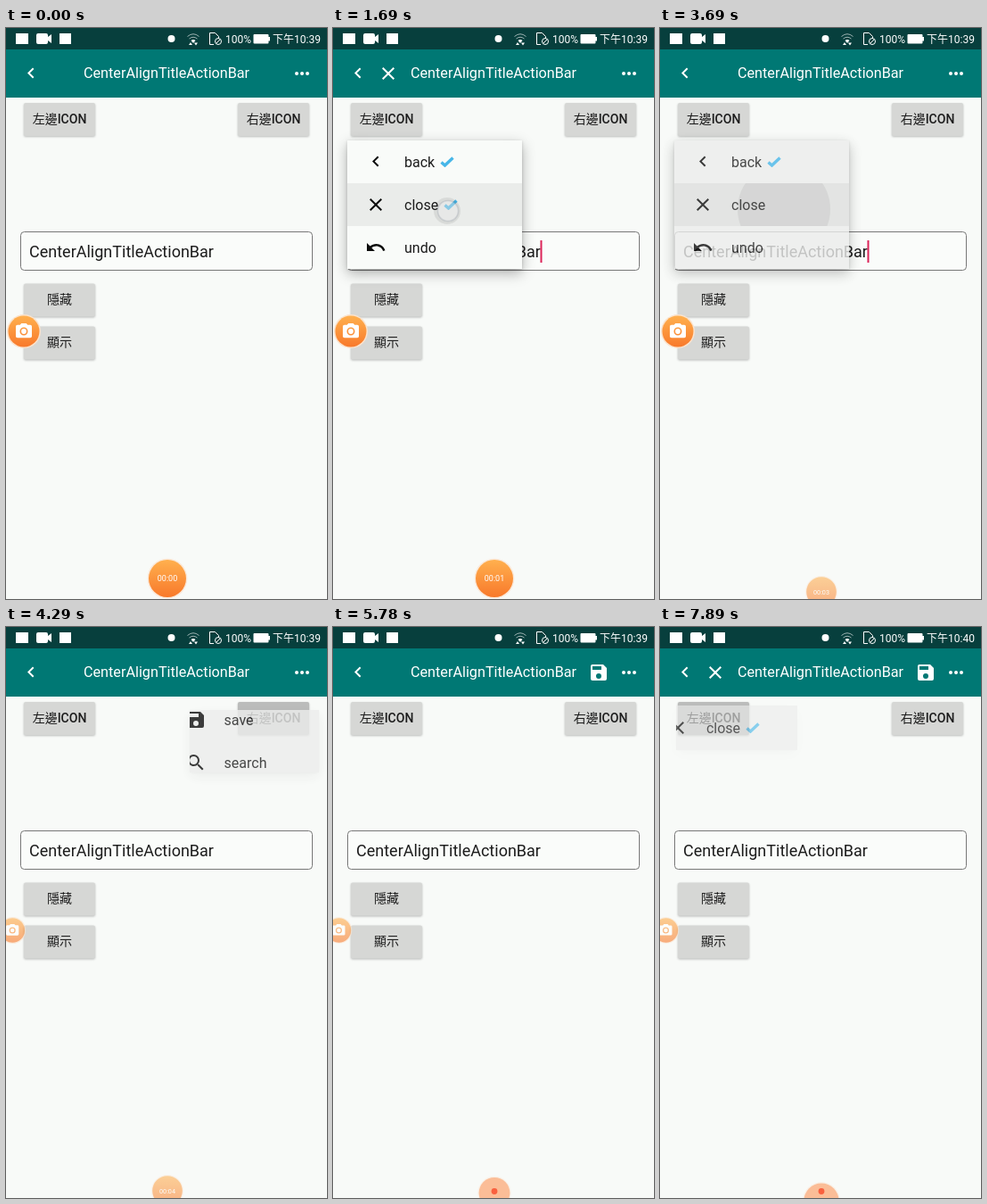
Animation, 360 px wide and 640 px high, one loop 7.99 s. Source, as an HTML page:

```html
<!DOCTYPE html>
<html lang="zh-Hant">
<head>
<meta charset="utf-8">
<title>CenterAlignTitleActionBar</title>
<style>
  html, body { margin: 0; width: 100%; height: 100%; overflow: hidden; background: #f8faf8; }
  body { position: relative; font-family: Roboto, "Noto Sans CJK TC", "Noto Sans CJK JP", "Noto Sans CJK", sans-serif; }
  svg text { font-family: inherit; }
  .layer { position: absolute; left: 0; top: 0; width: 360px; height: 640px; }
  .btn rect { fill: #d6d7d5; filter: drop-shadow(0 1px 1px rgba(0,0,0,.25)); }
  .btn.pressed rect { fill: #bbbcbb; }
  .btn text { font-size: 14px; font-weight: 500; fill: #1c1c1c; text-anchor: middle; }
  .menu { position: absolute; overflow: hidden; box-shadow: 0 5px 14px rgba(0,0,0,calc(.3 * var(--lift))), 0 1px 3px rgba(0,0,0,calc(.16 * var(--lift))); }
  .list { position: absolute; left: 50%; top: 50%; width: 196px; transform: translate(-50%, -50%); }
  .row { position: relative; height: 48px; overflow: hidden; font-size: 16px; line-height: 48px; color: #1c1c1c; }
  .row.held { background: rgba(0,0,0,.06); }
  .row > svg { position: absolute; left: 20px; top: 12px; fill: #0c0c0c; }
  .row span { position: absolute; left: 64px; top: 1px; white-space: nowrap; }
  .row .tick { margin-left: 6px; fill: none; stroke: #47b6e8; stroke-width: 3.4; }
  .ripple { position: absolute; border-radius: 50%; background: rgba(0,0,0,.075); transform: translate(-50%, -50%); }
</style>
</head>
<body>
<svg class="layer" viewBox="0 0 360 640">
  <defs>
    <path id="back" d="M15.400 16.100 10.800 11.500l4.600-4.600L14 5.500l-6 6 6 6z"/>
    <path id="close" d="M19 6.4 17.6 5 12 10.6 6.4 5 5 6.4l5.6 5.6L5 17.6 6.4 19l5.6-5.6 5.6 5.6 1.4-1.4-5.6-5.6z"/>
    <path id="undo" d="M12.5 8c-2.65 0-5.05.99-6.9 2.6L2 7v9h9l-3.62-3.62c1.39-1.16 3.16-1.88 5.12-1.88 3.54 0 6.55 2.31 7.6 5.5l2.37-.78C21.08 11.03 17.15 8 12.5 8z"/>
    <path id="horiz" d="M6 10a2 2 0 1 0 0 4 2 2 0 0 0 0-4zm6 0a2 2 0 1 0 0 4 2 2 0 0 0 0-4zm6 0a2 2 0 1 0 0 4 2 2 0 0 0 0-4z"/>
    <path id="save" d="M17 3H5a2 2 0 0 0-2 2v14a2 2 0 0 0 2 2h14a2 2 0 0 0 2-2V7zm-5 16a3 3 0 1 1 0-6 3 3 0 0 1 0 6zm3-10H5V5h10z"/>
    <path id="search" d="M15.5 14h-.8l-.3-.3a6.5 6.5 0 1 0-.7.7l.3.3v.8l5 5 1.5-1.5zm-6 0a4.5 4.5 0 1 1 0-9 4.5 4.5 0 0 1 0 9z"/>
    <path id="share" d="M18 16.1c-.8 0-1.4.3-2 .8l-7.1-4.2a3 3 0 0 0 0-1.4L16 7.2a3 3 0 1 0-.9-1.5l-7 4.1a3 3 0 1 0 0 4.400l7.100 4.200A2.900 2.900 0 1 0 18 16.100z"/>
    <linearGradient id="orange" x1="0" y1="0" x2="0" y2="1">
      <stop offset="0" stop-color="#ffb04e"/><stop offset="1" stop-color="#f8792b"/>
    </linearGradient>
  </defs>

  <rect width="360" height="78" fill="#007874"/>
  <rect width="360" height="24" fill="#073f3d"/>
  <g fill="#fff">
    <rect x="11" y="6" width="14" height="12"/>
    <path d="M36 6h9a2 2 0 0 1 2 2v2l4-3v10l-4-3v2a2 2 0 0 1-2 2h-9a2 2 0 0 1-2-2V8a2 2 0 0 1 2-2z"/>
    <rect x="60" y="6" width="13" height="12"/>
    <circle cx="185.5" cy="12" r="4"/>
    <g fill="none" stroke="#fff">
      <path opacity=".6" d="M203.500 9.500q6.500-5.500 13 0M205.500 12q4.500-3.500 9 0"/>
      <path d="M233 18.500h-4.500v-13h6l4 4v2"/>
      <circle cx="238" cy="15" r="3.500"/><path d="m236 17 4-4"/>
    </g>
    <path d="M207.500 14q2.500-2 5 0L210 17z"/>
    <path d="m205 19 2-3 2 3zM211 16.500h4l-2 3z"/>
    <rect x="277.500" y="7" width="17" height="10.500" rx="1"/><rect x="294" y="10" width="2" height="4.500"/>
    <text x="246" y="16.500" font-size="12">100%</text>
    <text x="299" y="16.500" font-size="12" id="clock"></text>
    <use href="#back" x="16" y="39"/>
    <use href="#close" x="50" y="39" id="barClose"/>
    <use href="#save" x="286" y="39" id="barSave"/>
    <use href="#horiz" x="320" y="39"/>
    <text x="87" y="56" font-size="16.2">CenterAlignTitleActionBar</text>
  </g>

  <g class="btn" id="leftBtn"><rect x="20" y="84" width="80" height="37" rx="2"/><text x="60" y="107">左邊ICON</text></g>
  <g class="btn" id="rightBtn"><rect x="260" y="84" width="80" height="37" rx="2"/><text x="300" y="107">右邊ICON</text></g>
  <g class="btn"><rect x="20" y="286.5" width="80" height="37" rx="2"/><text x="60" y="309">隱藏</text></g>
  <g class="btn"><rect x="20" y="334.5" width="80" height="37" rx="2"/><text x="60" y="357">顯示</text></g>

  <rect x="16.5" y="228.5" width="327" height="43" rx="4" fill="#fafcfa" stroke="#777"/>
  <text x="26" y="257" font-size="18" fill="#1c1c1c">CenterAlignTitleActionBar</text>
  <rect id="caret" x="232.5" y="238" width="2" height="25" fill="#dc2458"/>

  <g id="camera">
    <circle r="19" fill="#fbe3cd"/><circle r="17.5" fill="url(#orange)"/>
    <path transform="scale(.9) translate(-12 -12)" fill="#fff" d="M9 2 7.200 4H4a2 2 0 0 0-2 2v12a2 2 0 0 0 2 2h16a2 2 0 0 0 2-2V6a2 2 0 0 0-2-2h-3.200L15 2zm3 15a5 5 0 1 1 0-10 5 5 0 0 1 0 10zm0-1.800a3.200 3.200 0 1 0 0-6.400 3.200 3.200 0 0 0 0 6.400z"/>
  </g>
  <g id="recorder">
    <circle r="22.5" fill="#fbe9da"/><circle id="disc" r="21"/>
    <text id="timer" y="3.2" font-size="9" fill="#fff" text-anchor="middle"></text>
  </g>
  <circle id="stopDot" cx="181" cy="632.5" r="3.4" fill="#f9603f"/>
</svg>

<div class="menu" id="leftMenu"></div>
<div class="menu" id="rightMenu"></div>

<svg class="layer" viewBox="0 0 360 640">
  <circle id="touch" r="11.5" fill="rgba(255,255,255,.38)" stroke="rgba(110,120,140,.2)" stroke-width="1.5"/>
</svg>

<script>
const LOOP = 7990;
const $ = id => document.getElementById(id);
const clamp = v => Math.min(1, Math.max(0, v));
const mix = (a, b, p) => a + (b - a) * p;
const ramp = (t, a, b) => clamp((t - a) / (b - a));
const within = (t, spans) => spans.some(([a, b]) => t >= a && t < b);
const show = (id, on) => { $(id).style.display = on ? '' : 'none'; };

const ticks = [[0, 0, 1], [60, 60, 1], [480, 480, 1], [700, 1490, 9], [1590, 1690, 2],
  [1790, 2220, 6], [2700, 2700, 1], [2800, 3490, 8], [3590, 3690, 2], [3780, 4290, 6],
  [4390, 4990, 7], [5080, 5080, 1], [5200, 5400, 3], [5580, 5620, 2], [5780, 6480, 8],
  [6590, 7320, 9], [7510, 7510, 1], [7770, 7890, 2]]
  .flatMap(([a, b, n]) => Array.from({ length: n }, (_, i) => n > 1 ? mix(a, b, i / (n - 1)) : a));

// cubic-bezier(x1, 0, .2, 1)
function bezier(x1, t) {
  let lo = 0, hi = 1;
  for (let i = 0; i < 24; i++) {
    const s = (lo + hi) / 2, r = 1 - s;
    if (3 * r * r * s * x1 + .6 * r * s * s + s ** 3 < t) lo = s; else hi = s;
  }
  return 3 * (1 - lo) * lo * lo + lo ** 3;
}

const touches = [[690, 860, 80, 104], [1580, 1700, 129, 205], [2700, 2790, 81, 104],
  [3400, 3560, 136, 204], [4080, 4220, 300, 104], [4890, 5000, 295, 202],
  [6170, 6300, 81, 104], [6880, 6990, 130, 204], [7770, 7840, 81, 104]];

// runs: [open, exit, ripple start, ripple x, ripple y]
const menus = [
  { el: $('leftMenu'), x: 16, anchor: 60, items: ['back', 'close', 'undo'],
    runs: [[880, 1740, 1640, 128, 205], [2860, 3630, 3455, 139, 203],
           [6315, 7030, 6920, 130, 204], [7843, 9000, 9000, 0, 0]] },
  { el: $('rightMenu'), x: 164, anchor: 300, items: ['horiz', 'save', 'search', 'share'],
    runs: [[4230, 5080, 4920, 291, 202]] }
];
const tickIcon = '<svg class="tick" width="16" height="12"><path d="M1.5 6.5 5.5 10 14.5 1.5"/></svg>';
for (const m of menus) {
  m.h = m.items.length * 48;
  m.el.innerHTML = '<div class="list">' + m.items.map(n =>
    `<div class="row"><svg width="24" height="24"><use href="#${n}"/></svg><span>${n}${tickIcon}</span></div>`).join('') + '</div>';
  m.rows = [...m.el.querySelectorAll('.row')];
  m.marks = [...m.el.querySelectorAll('.tick')];
  m.ripple = document.createElement('div');
  m.ripple.className = 'ripple';
  m.rows[1].append(m.ripple);
}

function drawMenu(m, t, checked) {
  const run = m.runs.find(([open, exit]) => t >= open && t < exit + 300);
  m.el.style.display = run ? '' : 'none';
  if (!run) return;
  const [open, exit, press, rx, ry] = run;
  const k = clamp((t - open) / 250), px = bezier(0, k), py = bezier(.4, k);
  const w = mix(80, 196, px), h = mix(37, m.h, py);
  const cx = mix(m.anchor, m.x + 98, px), cy = mix(102, 126 + m.h / 2, py);
  const alpha = Math.min(clamp((t - open) / 75), 1 - ramp(t, exit, exit + 300));
  Object.assign(m.el.style, {
    left: cx - w / 2 + 'px', top: cy - h / 2 + 'px', width: w + 'px', height: h + 'px',
    opacity: alpha, background: alpha < 1 ? '#ecedec' : '#f9fbf9'
  });
  m.el.style.setProperty('--lift', py);
  m.marks.forEach((el, i) => { el.style.display = i === 0 || (i === 1 && checked) ? '' : 'none'; });
  m.rows[1].classList.toggle('held', t >= press - 50);
  const d = t >= press ? 10 + (t - press) * .4 : 0;
  Object.assign(m.ripple.style, {
    left: rx - m.x + 'px', top: ry - 174 + 'px', width: d + 'px', height: d + 'px'
  });
}

function place(id, x, y, scale, alpha) {
  $(id).setAttribute('transform', `translate(${x} ${y}) scale(${scale})`);
  $(id).setAttribute('opacity', alpha);
}

function draw(t) {
  const closeOn = within(t, [[1640, 3580], [6990, LOOP]]);
  const saveOn = t >= 4940;
  show('barClose', closeOn);
  show('barSave', saveOn);
  drawMenu(menus[0], t, closeOn);
  drawMenu(menus[1], t, saveOn);

  show('caret', within(t, [[480, 2220], [2700, 4090], [5080, 5580], [6080, 7510]]));
  $('clock').textContent = t < 7000 ? '下午10:39' : '下午10:40';

  const touch = touches.find(([a, b]) => t >= a && t < b);
  show('touch', touch);
  if (touch) {
    $('touch').setAttribute('cx', touch[2]);
    $('touch').setAttribute('cy', touch[3]);
  }
  const pressed = touches.find(([a, b, , y]) => y === 104 && t >= a + 60 && t < b + 280);
  $('leftBtn').classList.toggle('pressed', !!pressed && pressed[2] < 180);
  $('rightBtn').classList.toggle('pressed', !!pressed && pressed[2] > 180);

  const dock = ramp(t, 4100, 4300);
  place('camera', mix(20, 6.5, dock), 340, mix(1, .78, dock), mix(1, .6, dock));

  const sink = ramp(t, 2000, 2200), stopped = t >= 5600, low = ramp(t, 5700, 6080);
  place('recorder', 181, mix(617, 632, sink) + 11 * low, mix(1, .8, sink) + .13 * low, mix(1, .57, sink));
  $('disc').setAttribute('fill', stopped ? '#ff904e' : 'url(#orange)');
  show('timer', !stopped);
  show('stopDot', stopped);
  $('timer').textContent = '00:0' + Math.floor(t / 1000);
}

let last = -1;
function frame() {
  const now = performance.now() % LOOP;
  const t = ticks.filter(v => v <= now + .5).pop();
  if (t !== last) draw(last = t);
  requestAnimationFrame(frame);
}
frame();
</script>
</body>
</html>
```
